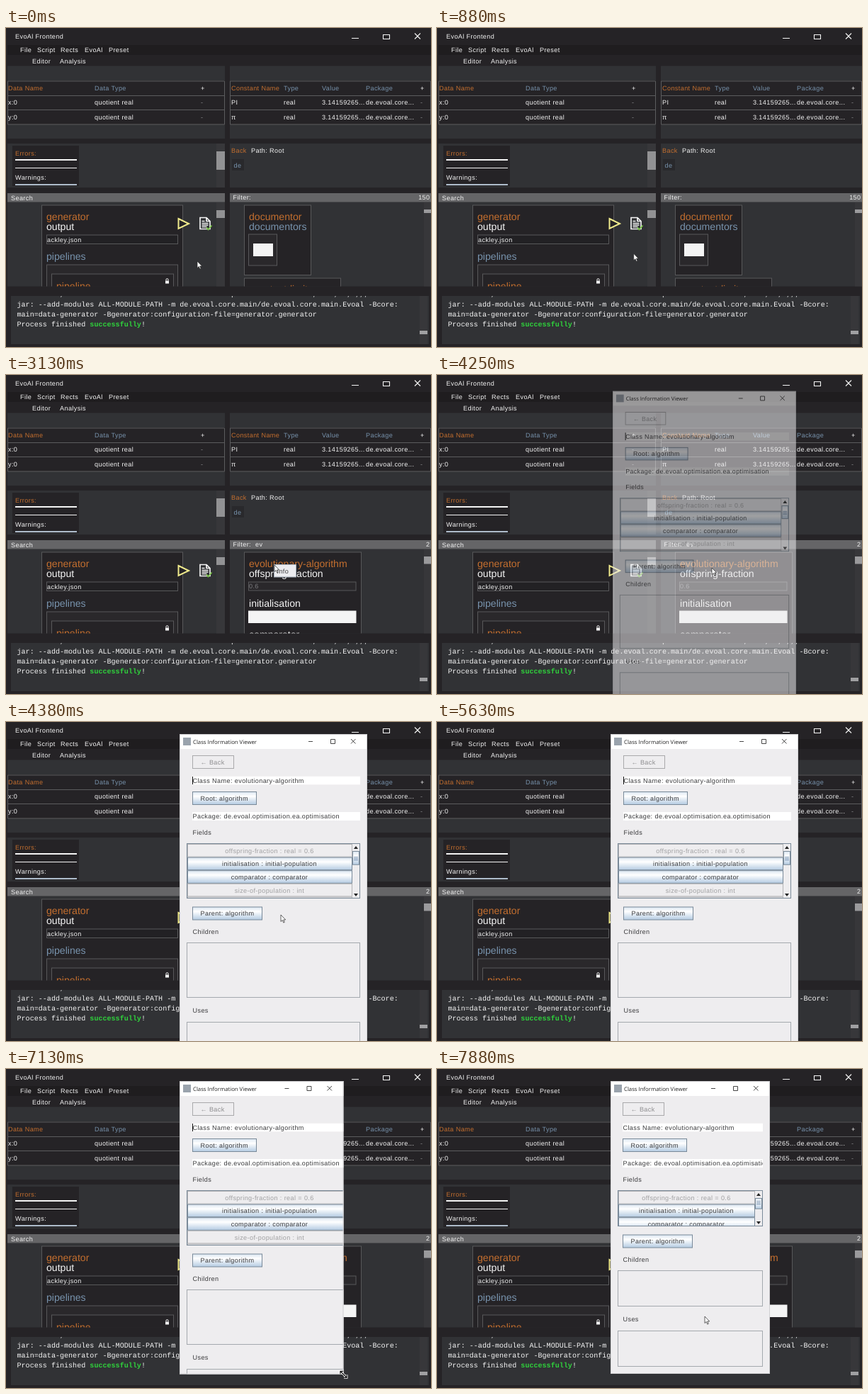
Recreate the animation shown at these times as an HTML page. Size 600 px wide and 450 px high, loop 8000 ms.

```html
<!DOCTYPE html>
<html lang="en">
<head>
<meta charset="utf-8">
<title>EvoAl Frontend</title>
<style>
html, body { margin: 0; width: 100%; height: 100%; overflow: hidden; background: #252326; }
svg { display: block; }
text { font: 9.1px "Liberation Sans", Arial, sans-serif; letter-spacing: .39px; white-space: pre; text-rendering: geometricPrecision; }
.big { font-size: 14.1px; letter-spacing: 0; }
.mono { font: 10.08px "Liberation Mono", "Courier New", monospace; letter-spacing: 0; }
.title { font: 7.75px "Open Sans", sans-serif; letter-spacing: 0; }
.mid { text-anchor: middle; }
.end { text-anchor: end; }
</style>
</head>
<body>
<svg id="stage" width="600" height="450" viewBox="0 0 600 450"></svg>
<script>
const ORANGE = '#c46f2f', BLUE = '#7893ad', WHITE = '#f4f4f4', DARK = '#252326', PANEL = '#313235',
      TRACK = '#37373a', LINE = '#58585a', STEEL = '#7a8a99', INK = '#3b3b3d';

const text = (x, y, s, fill = WHITE, cls = '') =>
  `<text x="${x}" y="${y}" fill="${fill}" class="${cls}">${s}</text>`;
const big = (x, y, s, fill) => text(x, y, s, fill, 'big');
// Rectangles are given by their edges; outlined ones sit on pixel centres.
const rect = (l, t, r, b, fill, stroke) => {
  const o = stroke ? .5 : 0;
  return `<rect x="${l + o}" y="${t + o}" width="${r - l - 2 * o}" height="${b - t - 2 * o}" fill="${fill}" stroke="${stroke || 'none'}"/>`;
};
const path = (d, stroke, width = 1, fill = 'none') =>
  `<path d="${d}" stroke="${stroke}" stroke-width="${width}" fill="${fill}"/>`;
const group = (id, body) => `<g id="${id}">${body}</g>`;
const clip = (l, t, r, b, body) =>
  `<svg x="${l}" y="${t}" width="${r - l}" height="${b - t}" viewBox="${l} ${t} ${r - l} ${b - t}">${body}</svg>`;

function table(left, right, columns, head, rows) {
  let out = rect(left, 53.5, right, 156, PANEL) + rect(left, 74, right, 136, DARK) +
    path(`M${left} 75H${right - .5}V136H${left + .5}V75M${left} 95.5H${right}M${left} 115.5H${right}`, '#5c5c5e');
  head.forEach((s, i) => {
    const fill = i === 0 ? ORANGE : s === '+' ? WHITE : BLUE;
    out += text(columns[i], 88, s, fill);
  });
  rows.forEach((row, r) => row.forEach((s, i) =>
    out += text(columns[i], 108.3 + r * 20.5, s, s === '-' ? '#8a8a8c' : WHITE)));
  return out;
}

function chrome() {
  let out = rect(0, 0, 600, 450, DARK) + rect(2, 24, 600, 38, '#1f1d1f') +
    text(13, 15.4, 'EvoAl Frontend') +
    path('M488 14.5h10M532.5 9.5h9v6h-9zM577 7.5l8 8m0-8l-8 8', WHITE, 1.1);
  [[20, 'File'], [44, 'Script'], [77, 'Rects'], [111, 'EvoAl'], [145, 'Preset']]
    .forEach(([x, s]) => out += text(x, 34, s));
  return out + text(37, 49.5, 'Editor') + text(76, 49.5, 'Analysis');
}

function messages() {
  return rect(2, 163, 309, 225, PANEL) + rect(9, 166, 103, 223, DARK) +
    text(13, 179.7, 'Errors:', ORANGE) + text(13, 214.2, 'Warnings:') +
    rect(13, 185, 100, 187, WHITE) + rect(13, 197, 100, 198, WHITE) + rect(13, 220, 100, 222, '#aebccb') +
    rect(297, 163, 309, 225, TRACK) + rect(297, 174, 309, 200, '#929294') +
    rect(316, 163, 600, 225, PANEL) + text(318, 176, 'Back', ORANGE) + text(346, 176, 'Path: Root') +
    rect(319, 185, 336, 201, '#29292c') + text(321.5, 196.5, 'de', BLUE);
}

function editor() {
  return rect(2, 233, 309, 364.5, PANEL) + rect(2, 233, 309, 245.5, '#656567') + text(7, 242.5, 'Search') +
    clip(2, 246, 309, 364.5,
      rect(297, 246, 309, 365, TRACK) + rect(297, 257, 309, 268, '#929294') +
      rect(50, 249.5, 250, 400, DARK, LINE) +
      big(57, 271.2, 'generator', ORANGE) + big(57, 284.9, 'output', WHITE) +
      rect(57, 291.5, 243, 305, '#222124', LINE) + text(58, 301.5, 'ackley.json') +
      big(57, 326.8, 'pipelines', BLUE) +
      rect(57, 333.5, 243, 400, '#2a282b', LINE) + rect(64, 346.5, 237, 400, DARK, LINE) +
      big(71, 368.5, 'pipeline', ORANGE) +
      rect(225, 356.5, 230, 360.5, WHITE) + path('M226 356.5v-1.5a1.5 1.5 0 0 1 3 0v1.5', WHITE) +
      path('M243.5 269L258 276L243.5 283Z', '#f0eb8c', 2, DARK) +
      path('M274 267.5h9l5 5v11h-14zM283 267.5v5h5M276.5 272.5h4M276.5 275.5h9M276.5 278h9M276.5 280.5h7', WHITE, 1.7) +
      path('M283 281.5l2.5 3l5-6', '#79c943', 1.6));
}

function library() {
  const all = rect(336, 249.5, 431, 349, DARK, LINE) +
    big(343, 270.7, 'documentor', ORANGE) + big(343, 284.6, 'documentors', BLUE) +
    rect(342, 290.5, 383, 335.5, '#2a282b', LINE) + rect(349, 304, 377, 322, WHITE) +
    rect(336, 352.5, 473, 400, DARK, LINE) + big(343, 372.8, 'constant-limit', ORANGE) +
    rect(590, 256, 600, 261, '#9a9a9c');
  const found = rect(336, 249.5, 502, 400, DARK, LINE) +
    big(343, 270.9, 'evolutionary-algorithm', ORANGE) + big(343, 284.6, 'offspring-fraction', WHITE) +
    rect(342, 291.5, 494.5, 304.5, '#2a282b', LINE) + text(343, 301, '0.6', '#7d7d80') +
    big(343, 326.6, 'initialisation', WHITE) + rect(342, 332.5, 494.5, 350, WHITE) +
    big(343, 370.7, 'comparator', WHITE) + rect(590, 256, 600, 266.5, '#9a9a9c');
  return rect(316, 233, 600, 364.5, PANEL) + rect(316, 233, 600, 245.5, '#656567') +
    text(320.5, 242.3, 'Filter:') + '<text id="query" x="352" y="242.3" fill="#f4f4f4"></text>' +
    '<text id="count" x="598.5" y="242.3" fill="#f4f4f4" class="end"></text>' +
    group('caret', rect(357, 234, 358, 244, WHITE)) +
    clip(316, 246, 600, 364.5, rect(590, 246, 600, 365, TRACK) + group('all', all) + group('found', found));
}

function consolePane() {
  const mono = (x, y, s) => text(x, y, s, WHITE, 'mono');
  const tails = ' '.repeat(10) + ',' + ' '.repeat(39) + 'p' + ' '.repeat(18) + ',    ,  , ,,,';
  return clip(7, 378, 597, 446, rect(7, 378, 597, 446, PANEL) +
    mono(15.5, 378, tails) +
    mono(15.5, 393, 'jar: --add-modules ALL-MODULE-PATH -m de.evoal.core.main/de.evoal.core.main.Evoal -Bcore:') +
    mono(15.5, 406.7, 'main=data-generator -Bgenerator:configuration-file=generator.generator') +
    mono(15.5, 420.5, 'Process finished <tspan font-weight="bold" fill="#2fd23c">successfully</tspan>!') +
    rect(584, 378, 595, 446, TRACK) + rect(584, 427, 595, 432, '#a0a0a2'));
}

// Dialog content for a given right edge, left inset and list height.
function form(right, left, listHeight, caret) {
  const listEnd = 171 + listHeight, center = (right + 233) / 2 + .5, inner = right - 21;
  const button = (y, w, s, on = true) =>
    rect(left, y, left + w, y + 19, on ? 'url(#metal)' : '#eeedef', on ? STEEL : '#a9a9ab') +
    text(left + 11.5, y + 12.9, s, on ? INK : '#8d8d8f');
  const field = (y, s) => clip(left, y, right - 10, y + 12,
    rect(left, y, right - 10, y + 12, '#fff') + text(left + .5, y + 9, s, INK));
  const box = y => rect(255, y, right - 10, y + listHeight, '#eeedef', '#a4a9ae');
  let rows = '';
  ['offspring-fraction : real = 0.6', 'initialisation : initial-population', 'comparator : comparator',
   'size-of-population : int', 'offspring : int'].forEach((s, i) => {
    const y = 172 + i * 18.6, on = i === 1 || i === 2;
    rows += rect(256, y, inner, y + 18.6, on ? 'url(#metal)' : '#eeedef', on ? STEEL : '#b4b4b6') +
      text(center, y + 12.8, s, on ? INK : '#a0a0a2', 'mid');
  });
  const thumb = 182 + listHeight * .15, bar = inner + 5;
  const uses = listEnd + 62 + listHeight;
  return button(47, 59, '← Back', false) + field(76.5, 'Class Name: evolutionary-algorithm') +
    (caret ? rect(left, 77, left + 1, 88, '#111') : '') +
    button(98, 91, 'Root: algorithm') + field(127, 'Package: de.evoal.optimisation.ea.optimisation') +
    text(left + .5, 158.7, 'Fields', INK) +
    clip(255, 171, right - 10, listEnd, rows + rect(inner, 171, right - 10, listEnd, '#eeedef') +
      rect(inner, 182, right - 11, thumb + 8, 'url(#metal)', STEEL) +
      path(`M${inner + 2} ${thumb - 3}h6m-6 2h6m-6 2h6`, '#6382a5', .8) +
      path(`M${bar - 3} 179l3-4l3 4zM${bar - 3} ${listEnd - 7}l3 4l3-4z`, 'none', 0, '#222') +
      rect(255, 171, right - 10, listEnd, 'none', STEEL)) +
    button(listEnd + 11.5, 99, 'Parent: algorithm') +
    text(left + .5, listEnd + 50.3, 'Children', INK) + box(listEnd + 62) +
    text(left + .5, uses + 21.2, 'Uses', INK) + box(uses + 34);
}

const stage = document.getElementById('stage');
stage.innerHTML =
  `<defs><linearGradient id="metal" x2="0" y2="1"><stop stop-color="#dbe6f1"/><stop offset=".35" stop-color="#fff"/>
   <stop offset="1" stop-color="#b4cbe2"/></linearGradient></defs>` +
  chrome() +
  table(2, 309, [3, 125, 275], ['Data Name', 'Data Type', '+'],
    ['x:0', 'y:0'].map(s => [s, 'quotient real', '-'])) +
  table(316, 600, [318, 392, 446, 508, 585], ['Constant Name', 'Type', 'Value', 'Package', '+'],
    ['PI', 'π'].map(s => [s, 'real', '3.14159265...', 'de.evoal.core...', '-'])) +
  messages() + editor() + library() + consolePane() +
  group('popup', rect(378, 267, 410, 285.5, '#ececef', '#a3adb8') + text(382.5, 279.5, 'Info', '#444')) +
  group('dialog', `<svg id="frame" x="245" y="17">
    <g transform="translate(-245 -17)">` +
    rect(245, 17, 520, 520, '#eeedef') + rect(245, 17, 520, 38, '#fff') +
    rect(250, 22, 261, 33, '#9aa3ad') + text(264, 30.5, 'Class Information Viewer', '#222', 'title') +
    group('wide', form(510, 263, 78, true)) + group('narrow', form(470, 262, 51, false)) +
    group('buttons', path('M-83 27.5h6M-51.5 24.5h6v6h-6zM-23 24l6.5 6.5m0-6.5l-6.5 6.5', '#333', .9)) +
    '</g></svg>' + '<rect id="edge" x="245.5" y="17.5" fill="none" stroke="#d0d0d2"/>') +
  group('arrow', path('M0 0v9.5l2.2-2l1.6 3.6l1.5-.7l-1.6-3.4h3z', '#222', .7, '#fff')) +
  group('beam', path('M-2.5-5h5M0-5v10M-2.5 5h5', WHITE)) +
  group('resize', path('M-4-4l8 8M-4.5-.5v-4h4M4.5 .5v4h-4', '#fff', 3) +
    path('M-4-4l8 8M-4.5-.5v-4h4M4.5 .5v4h-4', '#111', 1.2));

const el = id => document.getElementById(id);
const show = (id, on) => el(id).setAttribute('display', on ? 'inline' : 'none');
const set = (id, attrs) => Object.entries(attrs).forEach(([k, v]) => el(id).setAttribute(k, v));

const POINTER = [[0, 270, 329], [600, 270, 329], [1000, 280, 315], [1625, 371, 240], [2500, 371, 240],
  [2875, 379, 268], [3250, 379, 268], [3750, 388, 272], [4375, 388, 272], [4875, 512, 465], [6200, 510, 512],
  [6875, 495, 433], [7250, 470, 430], [7500, 470, 430], [7875, 378, 349], [8000, 378, 349]];
const CORNER = [[0, 510, 512], [6200, 510, 512], [6875, 495, 432], [7250, 470, 430], [8000, 470, 430]];

function along(keys, t) {
  const i = keys.findIndex(k => k[0] > t), [t0, x0, y0] = keys[i - 1], [t1, x1, y1] = keys[i];
  const u = (t - t0) / (t1 - t0), e = u * u * (3 - 2 * u);
  return [x0 + (x1 - x0) * e, y0 + (y1 - y0) * e];
}

function draw(now) {
  const t = Math.floor(now % 8000 / 125) * 125;
  const typed = t >= 2000, filtered = t >= 2500;
  el('query').textContent = filtered ? 'ev' : typed ? 'e' : '';
  el('count').textContent = filtered ? '2' : typed ? '117' : '150';
  show('caret', typed && !filtered);
  show('all', !filtered);
  show('found', filtered);
  show('popup', t >= 3000 && t < 3875);

  const fade = Math.min(1, Math.max(0, (t - 4105) / 270));
  const [right, bottom] = along(CORNER, t), width = right - 245, height = bottom - 17;
  set('dialog', { opacity: fade, transform: `translate(377.5 264) scale(${.95 + .05 * fade}) translate(-377.5 -264)` });
  set('frame', { width, height });
  set('edge', { width: width - 1, height: height - 1 });
  set('buttons', { transform: `translate(${right} 0)` });
  show('dialog', fade > 0);
  show('wide', t < 7500);
  show('narrow', t >= 7500);

  const [x, y] = along(POINTER, t);
  const shape = t >= 6000 && t <= 7500 ? 'resize' : x > 316 && y > 233 && y < 245 ? 'beam' : 'arrow';
  for (const id of ['arrow', 'beam', 'resize']) show(id, id === shape);
  set(shape, { transform: `translate(${x} ${y})` });
  requestAnimationFrame(draw);
}
requestAnimationFrame(draw);
</script>
</body>
</html>
```
